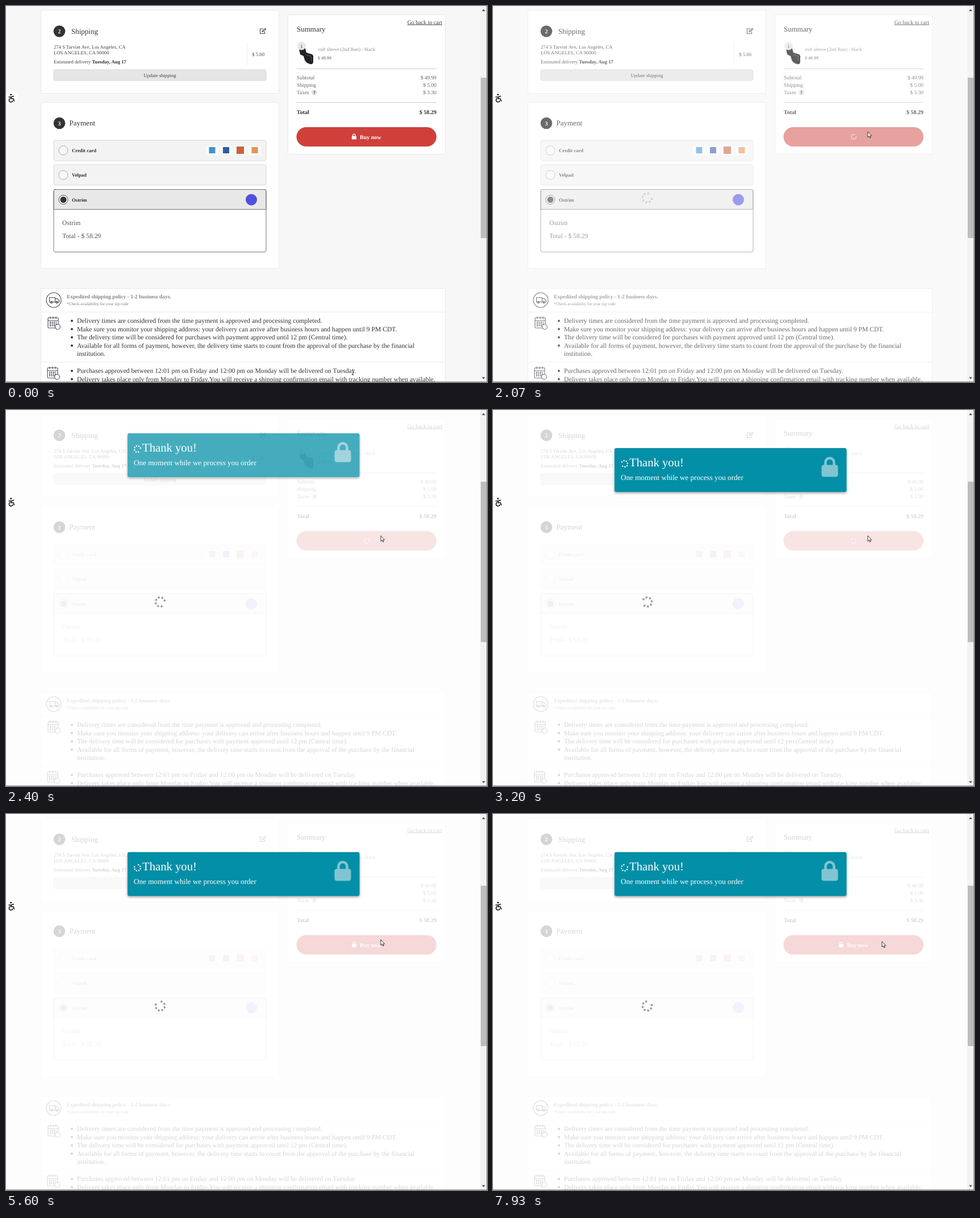
An HTML page for the animation above (8 s loop, 847 by 661 pixels).

```html
<!DOCTYPE html>
<html lang="en">
<head>
<meta charset="utf-8">
<title>Checkout</title>
<style>
html, body { margin: 0; width: 100%; height: 100%; overflow: hidden; background: #fff; }
svg { display: block; }
text { font-family: "Liberation Serif", "Times New Roman", serif; font-size: 8.7px; fill: #444; text-rendering: geometricPrecision; white-space: pre; }
.b { font-weight: bold; }
.dark { fill: #2e2e2e; }
.soft { fill: #8c8c8c; }
.head { font-size: 13px; fill: #333; }
.num { font-size: 10px; font-weight: bold; fill: #fff; text-anchor: middle; }
.sum { font-size: 9.4px; fill: #666; }
.big { font-size: 10px; }
.list { font-size: 11.63px; fill: #333; }
.end { text-anchor: end; }
.mid { text-anchor: middle; }
.card { fill: #fff; stroke: #e9e9e9; }
.row { fill: #f3f3f3; stroke: #d9d9d9; }
.icon { fill: none; stroke: #4a4a55; stroke-width: 1.1; }
.radio { fill: #f8f8f8; stroke: #aaa; }
</style>
</head>
<body>
<svg width="847" height="661" viewBox="0 0 847 661">
  <defs>
    <g id="spinner">
      <circle cy="-208" r="48"/><circle cy="208" r="48"/><circle cx="208" r="48"/><circle cx="-208" r="48"/>
      <circle cx="-147" cy="147" r="48"/><circle cx="147" cy="147" r="48"/><circle cx="-147" cy="-147" r="48"/>
    </g>
    <g id="lock">
      <rect y="15" width="28" height="20" rx="3"/>
      <path d="M6.500 17V10a7.500 7.500 0 0 1 15 0v7" fill="none" stroke-width="4.500"/>
    </g>
    <g id="calendar" class="icon">
      <rect x="-10" y="-9" width="18" height="18" rx="1.500"/>
      <path d="M-10-4H8M-6-11v4M-1-11v4M4-11v4"/>
      <path d="M-7-1H5M-7 2H5M-7 5H2" stroke-width="2" stroke-dasharray="2 1.500"/>
      <circle cx="7" cy="7" r="4.500" fill="#fff"/>
    </g>
  </defs>

  <g id="page">
    <rect width="847" height="661" fill="#f7f7f7"/>
    <circle cx="9" cy="161.500" r="11.500" fill="#fff"/>

    <!-- Shipping -->
    <rect class="card" x="61.500" y="7.500" width="419" height="146" rx="2"/>
    <circle cx="94" cy="44.500" r="10.300" fill="#333"/>
    <text class="num" x="94" y="48">2</text>
    <text class="head" x="115" y="48.500">Shipping</text>
    <path class="icon" d="M453 40h-5.500v8.500h8V45M451 45.500l.5-2 5-4 1.200 1.300-4.700 4.200z"/>
    <text x="84" y="74.500">274 S Tarvint Ave, Los Angeles, CA</text>
    <text x="84" y="85">LOS ANGELES, CA 90000</text>
    <text x="84" y="101">Estimated delivery <tspan class="b dark">Tuesday, Aug 17</tspan></text>
    <path d="M424.500 65v39" stroke="#eee"/>
    <text class="end" x="455" y="87.500">$ 5.00</text>
    <rect x="84" y="112" width="374" height="19" rx="3" fill="#e6e6e6" stroke="#d4d4d4"/>
    <text class="mid" x="271" y="125">Update shipping</text>

    <!-- Payment -->
    <rect class="card" x="61.500" y="169.500" width="419" height="292" rx="2"/>
    <circle cx="94" cy="206" r="10.300" fill="#333"/>
    <text class="num" x="94" y="209.500">3</text>
    <text class="head" x="111.500" y="210">Payment</text>
    <g id="options">
      <rect class="row" x="84" y="236" width="374" height="36" rx="3"/>
      <rect class="row" x="84" y="279" width="374" height="36" rx="3"/>
      <rect x="84" y="322.500" width="374" height="110" rx="3" fill="#fff"/>
      <path d="M84 357.500V325.500a3 3 0 0 1 3-3H455a3 3 0 0 1 3 3V357.500z" fill="#e8e8e8" stroke="#777"/>
      <rect x="84" y="322.500" width="374" height="110" rx="3" fill="none" stroke="#777"/>
      <circle class="radio" cx="101" cy="254" r="8"/>
      <circle class="radio" cx="101" cy="297" r="8"/>
      <circle class="radio" cx="101" cy="340.500" r="8" style="stroke:#555"/>
      <circle cx="101" cy="340.500" r="5.500" fill="#333"/>
      <text class="b dark" x="116" y="257">Credit card</text>
      <text class="b dark" x="116" y="300">Velpad</text>
      <text class="b dark" x="116" y="343.500">Ostrim</text>
      <path d="M352 246h22v16h-22zM376.500 246h22v16h-22zM401.500 246h22v16h-22zM427 246h22v16h-22z" fill="#fafafa"/>
      <path d="M357.500 248h11v11h-11z" fill="#3d94cf"/>
      <path d="M382 248h11v11h-11z" fill="#315aa0"/>
      <path d="M406 247h13v13h-13z" fill="#c9613f"/>
      <path d="M432.500 248h11v11h-11z" fill="#e4935a"/>
      <circle cx="432" cy="340.500" r="10" fill="#4f4fe0"/>
      <text class="list" x="99" y="385" style="fill:#555">Ostrim</text>
      <text class="list" x="99" y="408" style="fill:#555">Total - $ 58.29</text>
    </g>

    <!-- Summary -->
    <rect class="card" x="496.500" y="15.500" width="277" height="245" rx="2"/>
    <text class="big" x="768" y="31.500" text-anchor="end" text-decoration="underline">Go back to cart</text>
    <text class="head" x="512" y="44.500">Summary</text>
    <path d="M516 75q7-5 11 0l2 7 10 3q3 2 2 6v8q-1 4-6 3-7-2-9-7l-2-7-6-3z" fill="#222226"/>
    <path d="M528 86l9 2 1 9" fill="none" stroke="#55555c"/>
    <circle cx="520.500" cy="70.500" r="6.800" fill="#e8e8e8" stroke="#d2d2d2" stroke-width=".6"/>
    <text class="mid" x="520.500" y="73.500">1</text>
    <text class="soft" x="549" y="79">vult sleeve (2nd Run) - black</text>
    <text class="b soft" x="549" y="94" style="font-size:8px">$ 49.99</text>
    <path d="M512 110.500H758M512 169.500H758" stroke="#c9c9c9"/>
    <text class="sum" x="512" y="129">Subtotal</text><text class="sum end" x="758" y="129">$ 49.99</text>
    <text class="sum" x="512" y="142">Shipping</text><text class="sum end" x="758" y="142">$ 5.00</text>
    <text class="sum" x="512" y="154.500">Taxes</text><text class="sum end" x="758" y="154.500">$ 3.30</text>
    <circle cx="543" cy="151.800" r="5" fill="#e3e3e3"/>
    <text class="mid b" x="543" y="154.700">?</text>
    <text class="big b dark" x="512" y="189.500">Total</text><text class="big b dark end" x="758" y="189.500">$ 58.29</text>
    <g id="buy">
      <rect x="511.500" y="213" width="246.500" height="34" rx="17" fill="#d0403b"/>
      <g id="buyLabel">
        <use href="#lock" transform="translate(609 224.500) scale(.28)" fill="#fff" stroke="#fff"/>
        <text class="big b" x="623" y="233.500" style="fill:#fff">Buy now</text>
      </g>
      <use id="buySpin" href="#spinner" fill="#fff"/>
    </g>

    <!-- Delivery policy -->
    <rect class="card" x="61.500" y="496.500" width="712" height="180"/>
    <path d="M62 538H773M62 626H773" stroke="#ececec"/>
    <circle class="icon" cx="84" cy="517" r="13"/>
    <path class="icon" d="M76.500 512.500h10v8h-10zM86.500 514.500h4l3 3v3h-7"/>
    <circle class="icon" cx="80" cy="521" r="1.600" fill="#fff"/><circle class="icon" cx="89.500" cy="521" r="1.600" fill="#fff"/>
    <text class="b" x="107" y="514" style="font-size:9.450px;fill:#858585">Expedited shipping policy - 1-2 business days.</text>
    <text x="107" y="526" style="font-size:7.300px;fill:#777">*Check availability for your zip code</text>
    <use href="#calendar" x="84" y="557"/>
    <use href="#calendar" x="83" y="645"/>
    <g id="policy"></g>
  </g>

  <!-- Accessibility button -->
  <g fill="none" stroke="#111" stroke-width="1.600" stroke-linecap="round">
    <circle cx="8.700" cy="155.800" r=".7" fill="#111"/>
    <path d="M5 160l4.500-.3 4-1.200M9.500 160l-.5 3h4l1.500 4M7 162.500a3.400 3.400 0 1 0 5 4"/>
  </g>

  <!-- Scrollbar -->
  <rect x="835" width="12" height="661" fill="#f3f3f3"/>
  <rect x="836" y="126" width="10" height="282" fill="#bdbdbd"/>
  <path d="M838 9l3-3.500 3 3.500zM838 652.500l3 3.500 3-3.500z" fill="#505050"/>
  <path d="M846.500 0V661M0 660.500H847" stroke="#999"/>

  <use id="paySpin" href="#spinner" fill="#999"/>

  <g id="banner">
    <rect x="214" y="67" width="408.500" height="77" rx="3" fill="#028fa7" style="filter:drop-shadow(0 2px 2px #0006)"/>
    <use id="bannerSpin" href="#spinner" fill="#fff"/>
    <text x="240" y="98.500" style="font-size:20.700px;fill:#fff">Thank you!</text>
    <text x="225" y="123" style="font-size:13.130px;fill:#fff">One moment while we process you order</text>
    <use href="#lock" x="579" y="82" fill="#80c5d1" stroke="#80c5d1"/>
  </g>

  <path id="beam" d="M609 639.500h3.500M610.800 639.500v9M609 648.500h3.500" fill="none" stroke="#555"/>
  <path id="arrow" d="M0 0V9.800L2.200 7.800 3.700 11 5.200 10.300 3.800 7.200H6.700z" fill="#fff" stroke="#222" stroke-width=".9"/>
</svg>
<script>
const LOOP = 8000;
const $ = id => document.getElementById(id);
const clamp = v => Math.min(1, Math.max(0, v));
const span = (t, from, to) => clamp((t - from) / (to - from));
const smooth = p => p * p * (3 - 2 * p);
const mix = (a, b, p) => a + (b - a) * p;
const show = (id, on) => $(id).style.visibility = on ? "visible" : "hidden";

const policy = [
  [557, "Delivery times are considered from the time payment is approved and processing completed."],
  [571.5, "Make sure you monitor your shipping address: your delivery can arrive after business hours and happen until 9 PM CDT."],
  [586, "The delivery time will be considered for purchases with payment approved until 12 pm (Central time)."],
  [600.5, "Available for all forms of payment, however, the delivery time starts to count from the approval of the purchase by the financial"],
  [615, "institution."],
  [645, "Purchases approved between 12:01 pm on Friday and 12:00 pm on Monday will be delivered on Tuesday."],
  [659.5, "Delivery takes place only from Monday to Friday.You will receive a shipping confirmation email with tracking number when available."]
];
$("policy").innerHTML = policy.map(([y, line]) =>
  (line === "institution." ? "" : `<circle cx="116" cy="${y - 3.5}" r="2" fill="#333"/>`) +
  `<text class="list" x="125" y="${y}">${line}</text>`).join("");

function spin(id, x, y, size, t) {
  $(id).setAttribute("transform", `translate(${x} ${y}) rotate(${t * 0.18}) scale(${size / 512})`);
}

function draw(t) {
  const fade = span(t, 1950, 2300);
  $("page").style.opacity = mix(1, 0.2, fade);
  $("options").style.opacity = mix(1, 0.35, fade);

  const busy = t >= 1900 && t < 4870;
  $("buy").style.opacity = busy ? 0.68 : 1;
  show("buyLabel", !busy);
  show("buySpin", busy);
  spin("buySpin", 635, 230, 10.5, t);
  $("paySpin").style.opacity = fade;
  spin("paySpin", 271.5, 337.5, 20, t);
  spin("bannerSpin", 231.5, 94.5, 13.5, t);

  const drop = span(t, 2270, 2570);
  show("banner", t >= 2265);
  $("banner").style.opacity = clamp(0.35 + 0.88 * drop);
  $("banner").setAttribute("transform", `translate(0 ${-145 * (1 - drop) ** 3})`);

  const reach = smooth(span(t, 1470, 1850));
  const leave = smooth(span(t, 7530, 7930));
  const x = mix(834, 660, reach) + 25 * leave;
  const y = mix(317, 221, reach) + 3 * leave;
  $("arrow").setAttribute("transform", `translate(${x} ${y})`);
  show("arrow", t >= 1465);
  show("beam", t < 70);
}

function tick() {
  draw(performance.now() % LOOP);
  requestAnimationFrame(tick);
}
tick();
</script>
</body>
</html>
```
